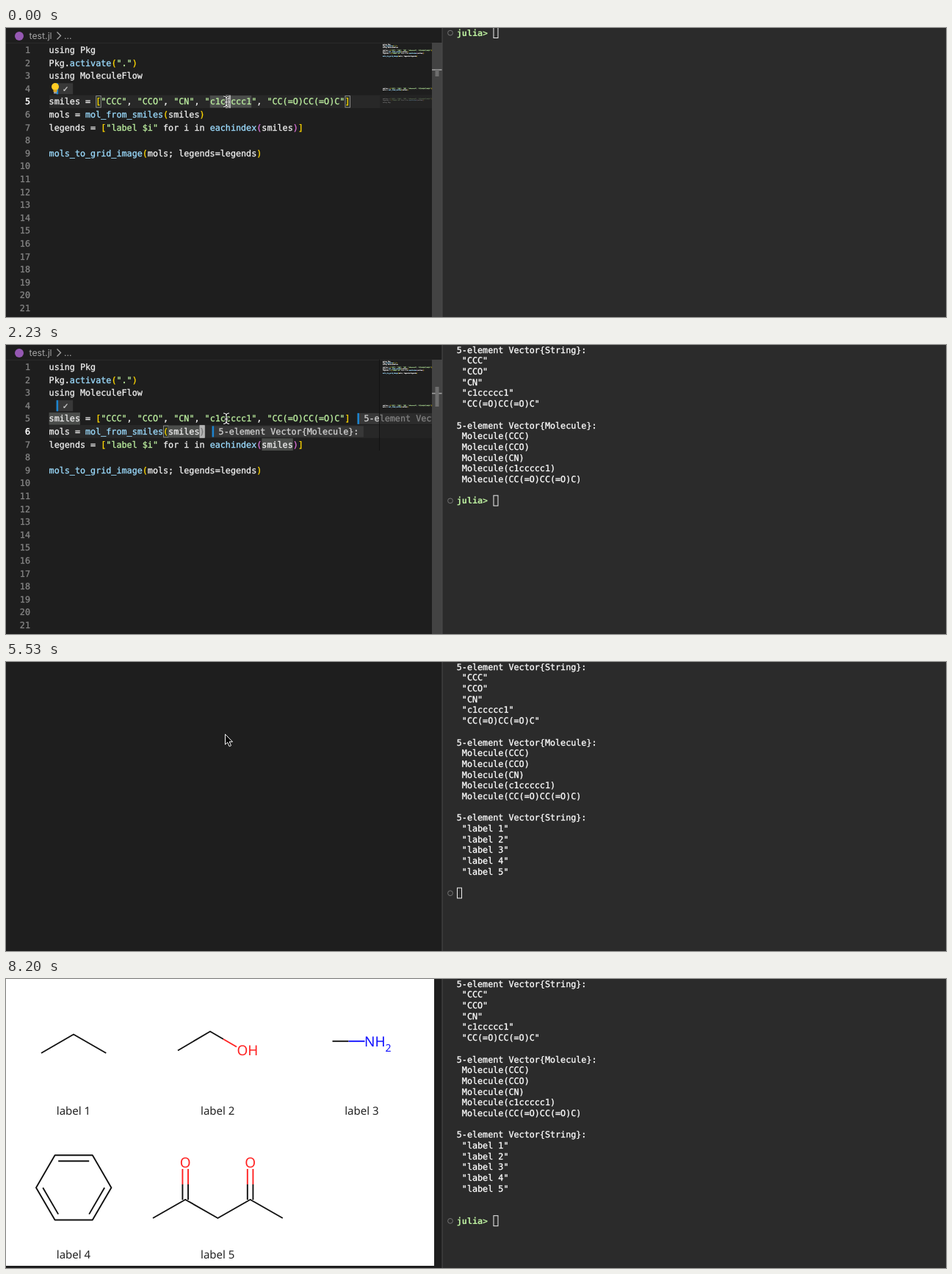
Write an HTML page that moves like this. It is 1280 by 394 pixels and loops after 8800 ms.

```html
<!DOCTYPE html>
<html lang="en">
<head>
<meta charset="utf-8">
<title>Molecule grid in an editor</title>
<style>
html, body { margin: 0; width: 100%; height: 100%; overflow: hidden; background: #1e1e1e; }
svg { display: block; width: 1280px; height: 394px; }
text { white-space: pre; text-rendering: geometricPrecision; }
.mono { font: 11.74px "DejaVu Sans Mono", monospace; color: #f0f0f0; }
.mono, .mono tspan { fill: currentColor; stroke: currentColor; stroke-width: .3px; }
.mini .mono, .mini tspan { stroke-width: 1.6px; }
.num { color: #858585; text-anchor: end; }
.now { color: #fff; }
.note { color: #d2d2d2; }
.ui { font: 12.3px Inter, sans-serif; fill: #a6a6a6; }
.chem { font: 19px "Noto Sans", sans-serif; }
.legend { font: 15px "Noto Sans", sans-serif; fill: #222; text-anchor: middle; }
.bond { fill: none; stroke-width: 1.9; stroke-linejoin: round; }
</style>
</head>
<body>
<svg id="stage" viewBox="0 0 1280 394"></svg>
<script>
const LOOP = 8800, END = LOOP;
const CW = 7.067, LEFT = 58.6, LINE = 17.6, ROW = 14.69, TERM = 613.8;
const RED = '#f22', BLUE = '#11f', GREEN = '#bdf0a0';

const code = [
  'using Pkg',
  'Pkg.activate(".")',
  'using MoleculeFlow',
  '',
  'smiles = ["CCC", "CCO", "CN", "c1ccccc1", "CC(=O)CC(=O)C"]',
  'mols = mol_from_smiles(smiles)',
  'legends = ["label $i" for i in eachindex(smiles)]',
  '',
  'mols_to_grid_image(mols; legends=legends)'
];

const midY = n => 30 + LINE * (n - 1);
const topY = n => midY(n) - LINE / 2;
const colX = c => LEFT + CW * c;
const rowY = r => 6.7 + ROW * r;
const markY = n => 57 + 9 * (n - 5);

const rect = (x, y, w, h, fill, more = '') =>
  `<rect x="${x}" y="${y}" width="${w}" height="${h}" fill="${fill}" ${more}/>`;
const text = (x, y, body, cls = 'mono', more = '') =>
  `<text x="${x}" y="${y}" class="${cls}" ${more}>${body}</text>`;
const path = (d, stroke = '#111') => `<path class="bond" d="${d}" stroke="${stroke}"/>`;
// Group shown during the given [from, to) spans
const during = (spans, body) => `<g data-on='${JSON.stringify(spans)}'>${body}</g>`;

function paint(src) {
  let depth = 0;
  return src.replace(/"[^"]*"|\w+(?=\()|[\[\](){}]/g, tok => {
    let color = '#9cdcfe';
    if (tok[0] === '"') color = GREEN;
    else if ('[('.includes(tok)) color = depth++ ? '#da70d6' : '#ffd700';
    else if (')]'.includes(tok)) color = --depth ? '#da70d6' : '#ffd700';
    return `<tspan style='color:${color}'>${tok}</tspan>`;
  });
}

// Caret stops: line, column, from, to, blink spans, bracket columns
const stops = [
  [5, 34, 0, 1190, [[0, 150], [600, 1190]], [9, 57]],
  [6, 29, 1190, 2530, [[1190, 1640], [2230, 2530]], [22, 29]],
  [7, 34, 2530, 3430, [[2530, 2980]], [10, 48]],
  [8, 0, 3430, 3580, [[3430, 3580]], []],
  [9, 34, 3580, 4930, [[3580, 4030], [4630, 4930]], [18, 40]],
  [10, 0, 4930, 5380, [[4930, 5380]], []]
];

// Word highlights: line, column, length, from, to
const words = [
  [5, 31, 8, 0, 1190],
  [5, 0, 6, 1340, 2530], [6, 23, 6, 1340, 2530], [7, 41, 6, 1340, 2530],
  [7, 31, 9, 2830, 3430],
  [9, 33, 7, 3880, 4930]
];

// Inline results: line, text, from, to
const results = [
  [4, '✓', 0, END],
  [5, '⟳', 600, 750], [5, '5-element Vector{String}:', 750, END],
  [6, '⟳', 1790, 1940], [6, '5-element Vector{Molecule}:', 1940, END],
  [7, '⟳', 2980, 3130], [7, '5-element Vector{String}:', 3130, END],
  [9, '⟳', 4030, END]
];

function caretLine([n, , from, to, , pair]) {
  return during([[from, to]],
    rect(59, topY(n), 521, LINE, '#282828') +
    pair.map(c => rect(colX(c) + .5, topY(n) + 1, CW - .5, LINE - 2, '#273027', 'stroke="#8a8a8a"')).join('') +
    rect(580, markY(n) - 1, 14, 2, '#8b8b8b') +
    text(33, midY(n) + 4, n, 'mono num now'));
}

function caret([n, c, , , blink]) {
  const ch = (code[n - 1] || '')[c] || '';
  return during(blink, rect(colX(c), topY(n), CW, LINE, '#b4b4b4') +
    text(colX(c), midY(n) + 4, ch, 'mono', 'style="color:#777"'));
}

function word([n, c, len, from, to]) {
  return during([[from, to]], rect(colX(c), topY(n) + .5, CW * len, LINE - 1, '#4b4d4b') +
    rect(584.5, markY(n), 5, 9, '#6e6e6e'));
}

function result([n, msg, from, to]) {
  const x = colX(code[n - 1].length) + 10, y = midY(n) - 7.5;
  return during([[from, to]], rect(x, y, 15.5 + CW * msg.length, 15, '#383838') +
    rect(x, y, 2.5, 15, '#1c84cf') +
    text(x + 9, midY(n) + 4, msg, 'mono note'));
}

function minimap() {
  const tiny = (y, n) => `<g class="mini" transform="translate(513 ${y}) scale(.163 .14)">${text(0, 0, paint(code[n]))}</g>`;
  return code.map((_, i) => tiny(22.5 + 2.05 * i, i)).join('') + tiny(83.3, 4) + tiny(85.3, 5) +
    during([[0, 600]], `<g opacity=".3">${tiny(97, 4)}${tiny(99, 6)}${tiny(102, 0)}</g>`);
}

function editor() {
  const nums = Array.from({ length: 21 }, (_, i) => text(33, midY(i + 1) + 4, i + 1, 'mono num')).join('');
  const lines = code.map((s, i) => text(LEFT, midY(i + 1) + 4, paint(s))).join('');
  const bulb = `<circle cx="67" cy="80" r="5" fill="#ffcc23"/>` +
    rect(64.5, 84, 5, 3, '#e0a91c') + rect(65, 87, 4, 2.5, '#9a9a9a');
  return `<circle cx="18" cy="11" r="6" fill="#9558b2"/>` +
    text(31.5, 14.5, 'test.jl', 'ui') + text(79, 14.5, '...', 'ui') +
    `<path d="M69.5 5.5l5 5-5 5" fill="none" stroke="#a6a6a6" stroke-width="1.3"/>` +
    rect(0, 20, 580, 1, '#2b2b2b') + rect(580, 20, 14, 374, '#434343') +
    nums + stops.map(caretLine).join('') + words.map(word).join('') + lines +
    `<g clip-path="url(#pane)">${results.map(result).join('')}</g>` +
    during([[0, 600]], bulb) + stops.map(caret).join('') +
    rect(509, 92, 71, 52, '#1e1e1e', 'opacity=".45"') + minimap() +
    during([[750, 2530]], rect(508, 20, 1, 124, '#131313')) +
    during([[3880, END]], rect(508, 20, 1, 302, '#131313'));
}

function terminal() {
  const smi = ['CCC', 'CCO', 'CN', 'c1ccccc1', 'CC(=O)CC(=O)C'];
  const block = (row, type, items, from) => during([[from, END]],
    [`5-element Vector{${type}}:`, ...items.map(s => ' ' + s)]
      .map((s, i) => text(TERM, rowY(row + i) + 4, s, 'mono now')).join(''));
  const prompt = (row, from, to, ready) => during([[from, to]],
    `<circle cx="605" cy="${rowY(row)}" r="3.4" fill="none" stroke="#747474"/>` +
    (ready ? text(TERM, rowY(row) + 4, 'julia&gt;', 'mono', `style="color:${GREEN};font-weight:bold;stroke:none"`) : '') +
    rect(TERM + .7 + (ready ? CW * 7 : 0), rowY(row) - 7.2, 6, 14, 'none', 'stroke="#eee"'));
  return rect(594, 0, 686, 394, '#2b2b2b') + rect(593.5, 0, 1, 394, '#4a4a4a') +
    block(0, 'String', smi.map(s => `"${s}"`), 750) +
    block(7, 'Molecule', smi.map(s => `Molecule(${s})`), 1940) +
    block(14, 'String', smi.map((_, i) => `"label ${i + 1}"`), 3130) +
    prompt(0, 0, 600, true) + prompt(0, 600, 750) +
    prompt(7, 750, 1790, true) + prompt(7, 1790, 1940) +
    prompt(14, 1940, 2980, true) + prompt(14, 2980, 3130) +
    prompt(21, 3130, 4030, true) + prompt(21, 4030, 5970) +
    prompt(22, 5970, END, true);
}

function plot() {
  const ring = (k, from, to) => Array.from({ length: to - from }, (_, i) => {
    const a = (from + i) * Math.PI / 3;
    return `${92.2 + 51.2 * k * Math.cos(a)} ${284.4 + 51 * k * Math.sin(a)}`;
  }).join('L');
  const legend = i => text(92 + 196.2 * (i % 3), i < 3 ? 185 : 381, `label ${i + 1}`, 'legend');
  const atom = (x, y, s, color, more = '') => text(x, y, s, 'chem', `fill="${color}" ${more}`);
  const ketone = x => path(`M${x - 3.8} 301V280M${x + 3.8} 301V280`) +
    path(`M${x - 3.8} 280V259M${x + 3.8} 280V259`, RED) +
    atom(x, 257, 'O', RED, 'text-anchor="middle"');
  return rect(0, 0, 583, 391, '#fff') +
    path('M48 101L92 75.5L136.3 101') +
    path('M234 97.5L278 71.5L296 82') + path('M296 82L314 92.5', RED) + atom(314.5, 104, 'OH', RED) +
    path('M444.5 84.8H466.5') + path('M466.5 84.8H488.5', BLUE) + atom(488, 92, 'NH', BLUE) +
    atom(516.5, 99, '2', BLUE, 'style="font-size:14px"') +
    path(`M${ring(1, 0, 6)}Z`) + [0, 2, 4].map(i => path(`M${ring(.82, i, i + 2)}`)).join('') +
    path('M200 326L244.2 300.7L288.4 326L332.6 300.7L376.8 326') + ketone(244.2) + ketone(332.6) +
    [0, 1, 2, 3, 4].map(legend).join('');
}

// Mouse arrow: start time and tip
const moves = [
  [5530, 298.5, 98.5], [5680, 299, 99.5], [6860, 280, 105], [7010, 317.5, 111.5],
  [7450, 372, 146], [7600, 560, 232], [7750, 790, 312], [7900, 1000, 356], [8050, 1203, 380]
];
const beam = 'M296 93Q300 93 300 96V104Q300 107.5 296 107.5M304 93Q300 93 300 96M300 104Q300 107.5 304 107.5M297.5 101H302.5';
const pointers =
  during([[0, 5530]], `<g fill="none"><path d="${beam}" stroke="#111" stroke-width="2.6"/><path d="${beam}" stroke="#fff" stroke-width="1.2"/></g>`) +
  during([[5530, 8200]], '<path id="arrow" d="M0 0V14L3.2 11L5.6 16.5L8 15.4L5.6 10.3H10Z" fill="#000" stroke="#fff"/>');

const stage = document.getElementById('stage');
stage.innerHTML = `<clipPath id="pane"><rect width="580" height="394"/></clipPath>` +
  rect(0, 0, 1280, 394, '#1e1e1e') +
  during([[0, 5380]], editor()) + during([[5680, END]], plot()) + terminal() + pointers;

const timed = [...stage.querySelectorAll('[data-on]')].map(el => ({ el, spans: JSON.parse(el.dataset.on) }));
const arrow = document.getElementById('arrow');

function draw(now) {
  const t = now % LOOP;
  for (const { el, spans } of timed)
    el.style.display = spans.some(([a, b]) => t >= a && t < b) ? '' : 'none';
  const [, x, y] = moves.findLast(m => t >= m[0]) || moves[0];
  arrow.setAttribute('transform', `translate(${x} ${y})`);
}

const start = performance.now();
function tick() {
  draw(performance.now() - start);
  requestAnimationFrame(tick);
}
tick();
</script>
</body>
</html>
```
